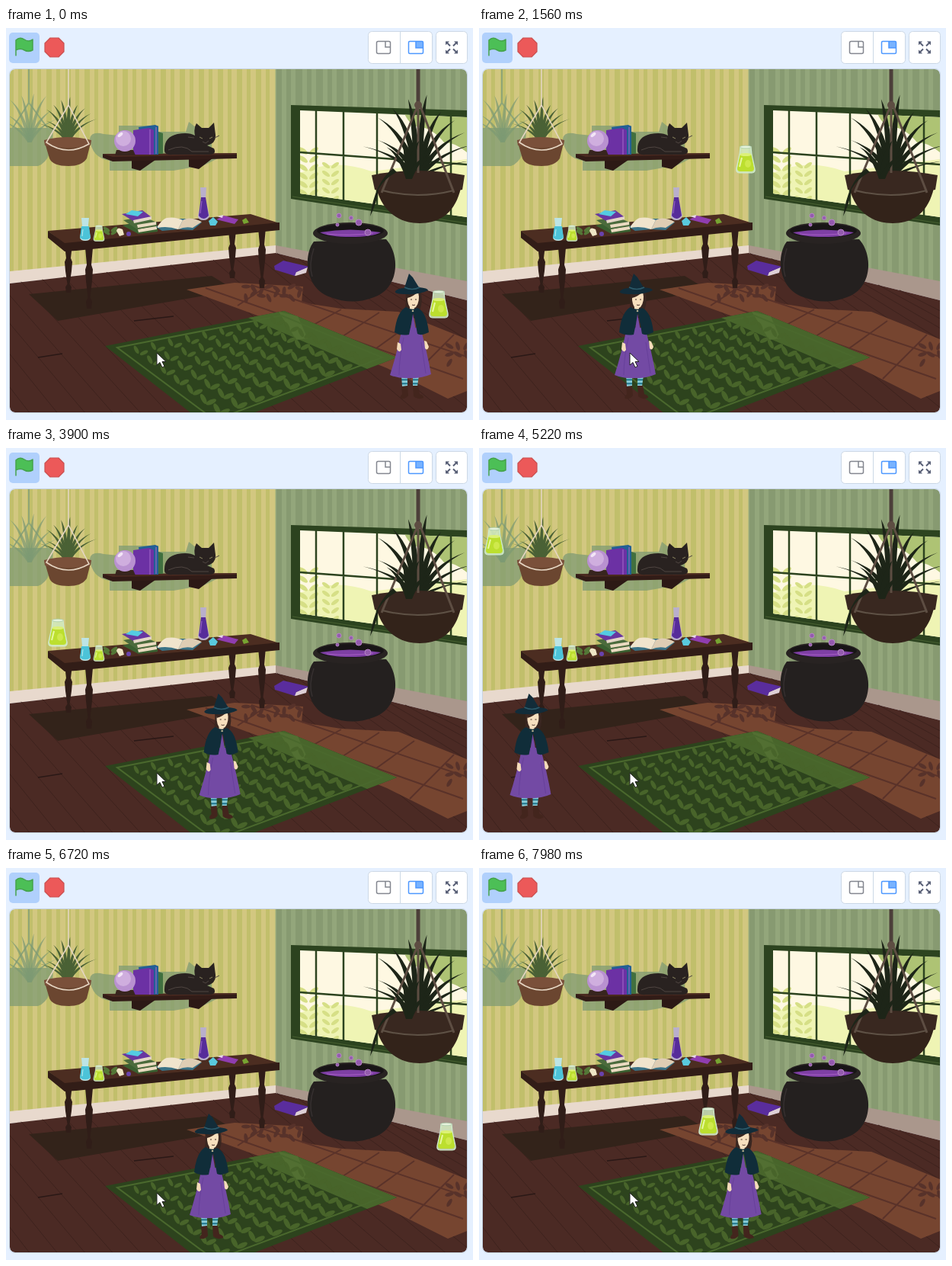
Write an HTML page that moves like this. It is 613 px wide and 514 px high and loops after 8 s.

```html
<!DOCTYPE html>
<html lang="en">
<head>
<meta charset="utf-8">
<title>Potion catching game</title>
<style>
html, body { margin: 0; width: 100%; height: 100%; overflow: hidden; background: #e5f0ff; }
svg { display: block; width: 613px; height: 514px; }
</style>
</head>
<body>
<svg viewBox="0 0 613 514">
<defs>
  <clipPath id="stage"><rect x="5" y="54" width="600" height="450" rx="7"/></clipPath>
  <clipPath id="glass"><path d="M386 108L605 117V248L386 217Z"/></clipPath>
  <pattern id="stripesL" width="25" height="20" patternUnits="userSpaceOnUse">
    <path fill="#d2c780" d="M0 0H25V20H0Z"/><path fill="#c1bf6b" d="M3 0H10V20H3ZM16 0H21V20H16Z"/>
  </pattern>
  <pattern id="stripesR" width="27" height="20" patternUnits="userSpaceOnUse">
    <path fill="#93a67b" d="M0 0H27V20H0Z"/><path fill="#879a71" d="M2 0H11V20H2ZM17 0H23V20H17Z"/>
  </pattern>
  <pattern id="socks" width="8" height="5" patternUnits="userSpaceOnUse">
    <path fill="#8fd0da" d="M0 0H8V5H0Z"/><path fill="#2d8196" d="M0 0H8V2.5H0Z"/>
  </pattern>
  <path id="leg" d="M-5 0H5L3 .28L5 .36L4 .55L1.500 .82L4 .88L3 1H-3L-4 .88L-1.500 .82L-4 .55L-5 .36L-3 .28Z"/>
  <g id="flask">
    <path fill="#d3ecc0" fill-opacity=".85" d="M-7-16H7L8-6L12 12Q13 18 8 18H-8Q-13 18-12 12L-8-6Z"/>
    <path fill="#bcdf2f" d="M-8-6H8L11 12Q11 16 7 16H-7Q-11 16-11 12Z"/>
    <ellipse cy="-6" rx="8" ry="2" fill="#dcf176"/>
    <path fill="none" stroke="#cfebcf" stroke-width="1.200" d="M-7-16H7L8-6L12 12Q13 18 8 18H-8Q-13 18-12 12L-8-6Z"/>
    <path stroke="#e6f8a0" stroke-width="2" d="M-5-2L-8 10"/>
    <ellipse cx="3" cy="6" rx="4" ry="5" fill="#cfe94c"/>
    <ellipse cy="-16" rx="7.500" ry="1.800" fill="#e6f3dc" stroke="#a5c9a6" stroke-width=".7"/>
  </g>
</defs>

<g id="toolbar">
  <rect x="4" y="6" width="40" height="40" rx="5" fill="#b0d0fc"/>
  <path d="M13 36V16Q18 11 24 15T35 15V29Q29 32 24 29T13 29" fill="#4cbf56" stroke="#45a24b" stroke-width="1.500" stroke-linejoin="round" stroke-linecap="round"/>
  <path d="M58 13H69L76 20V31L69 38H58L51 31V20Z" fill="#ec5959" stroke="#c95050" stroke-width="1.200" stroke-linejoin="round"/>
  <g fill="#fff" stroke="#ccd8e6">
    <rect x="475.500" y="4.500" width="84" height="42" rx="5"/><path d="M517.500 5V46"/>
    <rect x="564.500" y="4.500" width="41" height="42" rx="5"/>
  </g>
  <g fill="none" stroke="#83868f" stroke-width="1.500">
    <rect x="486.500" y="17.500" width="18" height="16" rx="2"/><path d="M498 18V25H504"/>
  </g>
  <path d="M538 18H547V26H538Z" fill="#79b3ff"/>
  <path d="M530 17.500H546Q547.500 17.500 547.500 19V32Q547.500 33.500 546 33.500H530Q528.500 33.500 528.500 32V19Q528.500 17.500 530 17.500ZM538 18V26H547" fill="none" stroke="#4c97ff" stroke-width="1.500"/>
  <g id="arrows" fill="#575e75" stroke="#575e75"></g>
</g>

<g clip-path="url(#stage)">
  <path fill="url(#stripesL)" d="M5 54H354V290L5 325Z"/>
  <path fill="url(#stripesR)" d="M354 54H605V336L354 290Z"/>
  <path stroke="#aab68a" d="M354 54V288"/>
  <path fill="#e8d9cd" d="M5 319L354 285V296L5 335Z"/>
  <path fill="#aa978c" d="M354 285L605 332V357L354 295Z"/>
  <path fill="#4b2a24" d="M5 335L354 295L605 357V504H5Z"/>
  <g id="planks" stroke="#3d221d" fill="none"></g>
  <path stroke="#2a1816" stroke-width="1.500" d="M42 432L74 427M168 384L220 378"/>

  <g id="wallShade" fill="#7d9a73" fill-opacity=".72">
    <path d="M5 131H62Q62 174 42 181H5ZM110 145Q112 135 128 139L148 141V128H200V136H236L240 123L250 131L270 133V165H290L260 180L220 187H136V174Q112 170 110 145Z"/>
    <path stroke="#8fa577" stroke-width="2" fill="none" d="M30 54V98L5 137M30 98L59 137"/>
    <g id="plantShadow"></g>
  </g>

  <path fill="#33231a" d="M30 349L270 325L301 344L68 384Z"/>
  <path fill="#764530" d="M237 343L300 334L390 339L388 360L440 368L515 372L605 408V476L580 486L500 446L330 377Z"/>
  <path stroke="#5a3229" stroke-width="2" fill="none" d="M262 341L600 460M322 337L605 431M345 337L304 364M440 369L386 399M490 373L430 412M536 384L472 430M588 402L530 460"/>
  <g id="floorLeaves" fill="#57322a"></g>

  <path fill="#2d431d" d="M130 417L365 371L513 432L270 526Z"/>
  <path fill="#48652b" d="M318 380L365 371L513 432L474 447Z"/>
  <path fill="#526f32" d="M358 372L383 378L396 407L381 409Z"/>
  <path fill="none" stroke="#4a682d" stroke-width="2" d="M146 419L362 377L494 432L274 514Z"/>
  <g id="rugLeaves" fill="#48642a"></g>

  <g id="window">
    <path fill="#2c431f" d="M374 101L605 108V259L374 224Z"/>
    <g clip-path="url(#glass)">
      <path fill="#fef8e2" d="M380 100H605V260H380Z"/>
      <path fill="#eff4b4" d="M386 190Q430 170 480 188L605 172V255H386Z"/>
      <path fill="#aec374" d="M522 110H605V163Q590 150 575 150Q560 132 545 130Q530 130 522 110Z"/>
      <g id="gardenLeaves" fill="#d6df86"></g>
    </g>
    <path fill="none" stroke="#2c431f" stroke-width="2.500" d="M407 107V222M443 109V230M487 110V237M584 112V250M386 163L605 179"/>
    <path stroke="#486031" d="M376 221L605 256"/>
  </g>

  <g id="smallPlant">
    <g id="smallBlades" fill="#4a6135"></g>
    <path fill="#6b4630" d="M50 147H112L106 171Q100 181 82 181Q61 181 57 171Z"/>
    <path fill="#7a503a" d="M50 147Q81 139 112 147L111 154Q81 160 51 154Z"/>
    <path fill="none" stroke="#e5d5c2" stroke-width="1.600" d="M82 54V101L53 150Q80 169 109 152L82 101"/>
  </g>

  <g id="shelf">
    <path fill="#2c1915" d="M165 173H196L176 187L165 184ZM240 171H271L253 185L240 182Z"/>
    <path fill="#4a2a20" d="M127 165L303 164V167L138 170Z"/>
    <path fill="#321c17" d="M127 165L140 169L303 166V171L140 175L127 170Z"/>
    <path fill="#235f95" d="M174 130L196 127L200 129V166H178Z"/>
    <path fill="#41703f" d="M200 136L206 138V165H200Z"/>
    <path fill="#6c31a4" d="M167 134L188 131L194 134V166H167Z"/>
    <path stroke="#a86acc" d="M189 133V166M197 130V165"/>
    <path fill="#38251e" d="M145 160H167L170 167H143Z"/>
    <circle cx="156" cy="148" r="14" fill="#b991d0"/>
    <circle cx="154" cy="145" r="10" fill="#cfaede"/>
    <ellipse cx="150" cy="140" rx="4" ry="2" fill="#f3e5f7" transform="rotate(-40 150 140)"/>
    <path fill="#292220" d="M208 161Q207 143 225 139Q240 136 248 141Q246 131 250 125L257 131H266L273 124L275 140Q276 151 264 154L273 158Q277 166 266 166H219Q208 167 208 161Z"/>
    <path fill="none" stroke="#4f4541" d="M213 160Q233 151 244 162H266M247 144L239 143M274 144L280 141M258 149L262 151L266 148"/>
    <path stroke="#8d8660" d="M254 143L258 145M267 145L271 143"/>
  </g>

  <g id="table">
    <g fill="#301d18">
      <use href="#leg" transform="translate(82 284) scale(1 63)"/><use href="#leg" transform="translate(109 288) scale(1 80)"/>
      <use href="#leg" transform="translate(297 266) scale(1 62)"/><use href="#leg" transform="translate(336 262) scale(1 79)"/>
    </g>
    <path fill="#4c2d21" d="M55 266L321 244L359 256L77 283Z"/>
    <path fill="#321d17" d="M55 266L77 282L359 255V265L92 292L77 293L55 275Z"/>
    <g transform="translate(104 264)"><path fill="#bde4e5" d="M-5-15H5L4-5L7 11Q6 15 0 15T-7 11L-4-5Z"/><path fill="#4cc3d8" d="M-5-4H5L7 11Q0 16-7 11Z"/><path stroke="#b8f1f5" d="M-3 0L-4 9"/></g>
    <use href="#flask" transform="translate(122 269) scale(.58)"/>
    <g id="herbs" fill="#547737"></g>
    <path fill="#eee6c5" d="M145 266Q146 260 153 264L155 271L149 273Z"/><circle cx="161" cy="270" r="3" fill="#6942ad"/>
    <path fill="#3a6030" d="M153 259L182 252L199 260V267L174 270Z"/><path fill="#eadac0" d="M173 264L198 259V264L174 268Z"/>
    <path fill="#4b6b3c" d="M154 252L180 247L198 255V260L172 264Z"/><path fill="#eadac0" d="M172 258L197 254V258L173 262Z"/>
    <path fill="#6836a0" d="M152 244L179 239L191 248L167 253Z"/><path fill="#e4d6c6" d="M167 252L191 247V251L168 256Z"/>
    <path fill="#54cbe2" d="M157 244L165 239L180 241L173 247Z"/>
    <path fill="#3a7286" d="M197 261L211 250H236L257 255L245 265L226 264L205 266Z"/>
    <path fill="#f0e4cd" d="M199 260Q206 250 211 249Q222 247 232 252L226 264Q212 259 199 262Z"/>
    <path fill="#decdb4" d="M232 252Q240 246 257 254L245 262Q235 260 226 264Z"/>
    <path fill="#b9afcc" d="M255 209H263L262 226L267 246Q266 252 259 252T252 246L256 226Z"/><path fill="#562c9a" d="M256 222H262L266 246Q259 254 253 246Z"/><path stroke="#9c69c7" d="M257 227L255 243"/>
    <path fill="#59c9dd" d="M266 253L272 248L278 254L275 259H268Z"/><path fill="#8f3db0" d="M276 251L286 246L305 251L300 257Z"/><path fill="#e6d5e8" d="M277 247L285 245L284 249Z"/>
    <path fill="#77a431" d="M310 252L315 249L319 255L312 257Z"/>
  </g>

  <path fill="#ded0d6" d="M354 313L381 320L396 313L394 321L380 325Z"/>
  <path fill="#5a2d9d" d="M352 312L364 305L398 313L381 320L379 325L353 317Z"/>

  <g id="cauldron">
    <path fill="#24201f" d="M404 280C390 298 392 342 426 353Q455 364 483 353C516 342 518 298 499 277Z"/>
    <ellipse cx="452" cy="269" rx="49" ry="14" fill="#282322"/><ellipse cx="452" cy="266" rx="44" ry="9" fill="#181516"/>
    <path fill="#7e3fa4" d="M412 268Q452 261 492 268Q480 274 452 274Q425 274 412 268Z"/><path stroke="#a85fc6" fill="none" d="M421 270Q450 273 482 269"/>
    <path fill="none" stroke="#363030" stroke-width="1.500" d="M404 289Q397 310 402 326"/>
    <g fill="#945bae" stroke="#b584c6"><circle cx="437" cy="246" r="3"/><circle cx="453" cy="249" r="2.500"/><circle cx="463" cy="255" r="4"/><circle cx="475" cy="268" r="4"/><circle cx="435" cy="258" r="2"/></g>
  </g>

  <g id="bigPlant" fill="#1d2518">
    <path stroke="#4c3f39" stroke-width="5" d="M541 54V100"/>
    <g id="bigBlades"></g>
    <path fill="#33231a" d="M486 210C494 240 515 256 543 256C572 256 590 240 597 210Z"/>
    <path fill="#392820" d="M480 193Q540 181 602 193L599 212Q540 224 484 212Z"/>
    <path fill="none" stroke="#5d4d42" stroke-width="3" d="M542 98L493 216M542 98L588 216M541 98V190"/>
    <path fill="none" stroke="#5e5145" stroke-width="2" d="M494 213Q540 225 588 213"/>
    <circle cx="541" cy="101" r="5" fill="#5d4d42"/>
    <g id="frontBlades"></g>
    <path d="M508 184Q484 203 478 247Q487 229 489 211Q498 196 513 189Z"/>
  </g>

  <use id="potion" href="#flask"/>
  <g id="witch">
    <path fill="url(#socks)" d="M-12 455H-4V470H-11ZM3 455H11L9 470H3Z"/>
    <path fill="#43251d" d="M-12 470L-4 469L-3 482Q-6 487-13 486Q-15 484-11 480ZM3 469H10L12 480Q18 482 17 485Q9 488 4 483Z"/>
    <path fill="#734aa4" d="M-11 393H13Q22 426 27 454Q13 460 0 459Q-16 460-27 455Q-18 427-11 393Z"/>
    <path fill="none" stroke="#67409a" d="M-9 406Q-15 433-15 455M14 412L20 453"/>
    <path fill="#f5dcba" d="M-17 412L-13 414L-12 422Q-15 427-18 421ZM18 410L21 411L24 418Q22 424 19 420Z"/>
    <path fill="#392620" d="M-7 345H13Q17 357 12 371Q5 373-8 370Q-5 360-7 345Z"/>
    <path fill="#f6dfbe" d="M-3 346H10Q13 358 7 366L5 367V373H-1V366Q-6 358-3 346Z"/>
    <path fill="#392620" d="M-6 345H11Q4 352-4 354Z"/>
    <path stroke="#493029" d="M0 356H2M6 356H8M2 363Q4 364 6 363" fill="none"/>
    <path fill="#102d39" d="M-6 366Q2 371 9 367Q21 372 24 399Q14 404 9 401L4 374L-2 402Q-13 404-21 399Q-18 372-6 366Z"/>
    <path fill="#734aa4" d="M3 375L8 402H-1Z"/><circle cx="3" cy="371" r="1.300" fill="#b9b08d"/>
    <path fill="#122c39" d="M-8 341Q-5 331-2 322Q3 326 6 332L11 340Q23 341 23 344Q11 350-5 349Q-22 349-20 345Q-16 341-8 341Z"/>
    <path fill="none" stroke="#2c5a6a" stroke-width="1.500" d="M-8 340Q2 345 12 340"/>
  </g>
</g>
<rect x="4.500" y="53.500" width="601" height="451" rx="7" fill="none" stroke="#c8d5e5"/>
<path d="M198 426V442L202 438.500L205 445L208 443.500L205 437.500H210Z" fill="#fff" stroke="#222"/>
</svg>
<script>
const $ = id => document.getElementById(id);
const mix = (a, b, k) => a + (b - a) * k;
const clamp = (v, limit) => Math.max(-limit, Math.min(limit, v));
const random = seed => { const s = Math.sin(seed * 12.9898) * 43758.5453; return s - Math.floor(s); };
const repeat = (n, draw) => Array.from({ length: n }, (_, i) => draw(i)).join('');

const leaf = (x, y, turn, size = 6) =>
  `<ellipse cx="${x}" cy="${y}" rx="${size}" ry="${size * .42}" transform="rotate(${turn} ${x} ${y})"/>`;
const sprig = (x, y, rows, gap, size) => repeat(rows, i =>
  leaf(x - size, y - i * gap, 35, size) + leaf(x + size, y - i * gap, -35, size));

// A fan of pointed blades from one root; the upright ones are longest.
const fan = (x, y, width, count, from, to, length) => repeat(count, i => {
  const angle = mix(from, to, i / (count - 1)) * Math.PI / 180;
  const reach = length * mix(.6, 1, Math.cos(angle) ** 2) * mix(.75, 1, random(i + 1));
  const tipX = x + Math.sin(angle) * reach, tipY = y - Math.cos(angle) * reach;
  const bendX = mix(x, tipX, .35), bendY = mix(y, tipY, .75);
  return `<path d="M${x - width} ${y}Q${bendX - width} ${bendY} ${tipX} ${tipY}Q${bendX + width} ${bendY} ${x + width} ${y}Z"/>`;
});

$('arrows').innerHTML = repeat(4, i => `<g transform="rotate(${i * 90} 585 25.500)">
  <path d="M587 23.500L591 19.500" stroke-width="2"/><path stroke="none" d="M588 17.500H593V22.500Z"/></g>`);
$('planks').innerHTML = repeat(25, i => {
  const x = -120 + i * 28, top = x < 354 ? 335 - x * .113 : 295 + (x - 354) * .247;
  return `<path d="M${x} ${top}L${x * 1.3 + 150} 504"/>`;
});
$('rugLeaves').innerHTML = repeat(63, i => {
  const u = .12 + (i % 9) * .095, v = .12 + Math.floor(i / 9) * .125;
  const x = mix(mix(130, 365, u), mix(270, 513, u), v), y = mix(mix(417, 371, u), mix(526, 432, u), v);
  const size = mix(5.5, 8, v);
  return leaf(x - 4, y - 2, 62, size) + leaf(x + 6, y + 2, -25, size);
});
$('floorLeaves').innerHTML =
  repeat(16, i => leaf(315 + i % 8 * 10, 339 + (i >> 3) * 9 + i % 3 * 3, i * 55)) +
  repeat(7, i => leaf(582 + i % 3 * 11, 417 + Math.floor(i / 3) * 11, 30 + i * 45));
$('gardenLeaves').innerHTML = sprig(397, 216, 6, 11, 7) + sprig(426, 224, 5, 11, 6) + sprig(558, 236, 3, 14, 8);
$('herbs').innerHTML = sprig(137, 268, 2, 4, 5);
$('plantShadow').innerHTML = fan(31, 150, 2.5, 8, -55, 50, 75);
$('smallBlades').innerHTML = fan(81, 149, 2.5, 10, -58, 52, 65);
$('bigBlades').innerHTML = fan(541, 197, 4.5, 11, -60, 72, 122);
$('frontBlades').innerHTML = fan(529, 198, 4, 4, -35, 40, 60);

const LOOP = 8000, FRAME = 60;
const WALK_SPEED = .375, FALL_SPEED = .31, DROP_TOP = 102, FALL_STEP = 10;
const WITCH_START = 531;
// When the witch sets off and where she stops.
const walks = [[60, 581], [475, 205], [1580, 355], [2600, 368], [2965, 280], [3440, 305],
  [3835, 30], [5120, 93], [5600, 43], [6120, 518], [7515, 330]];
// When a potion appears and at which x.
const drops = [[-839, 568], [120, 239], [1334, 350], [2000, 366], [2710, 269], [3448, 68],
  [4380, 78], [5156, 20], [5914, 578], [7238, 301]];

const begun = (events, t) => events.filter(([time]) => time <= t);
const witchX = t => begun(walks, t).reduce((x, [leave, goal], i) => {
  const end = Math.min(t, walks[i + 1]?.[0] ?? LOOP);
  return x + clamp(goal - x, WALK_SPEED * (end - leave));
}, WITCH_START);
const place = (id, x, y) => $(id).setAttribute('transform', `translate(${x} ${y})`);

function draw(now) {
  const t = Math.floor(now % LOOP / FRAME) * FRAME;
  const [start, x] = begun(drops, t).pop();
  place('witch', witchX(t), 0);
  place('potion', x, DROP_TOP + FALL_STEP * Math.round((t - start) * FALL_SPEED / FALL_STEP));
  requestAnimationFrame(() => draw(performance.now() - origin));
}
const origin = performance.now();
draw(0);
</script>
</body>
</html>
```
